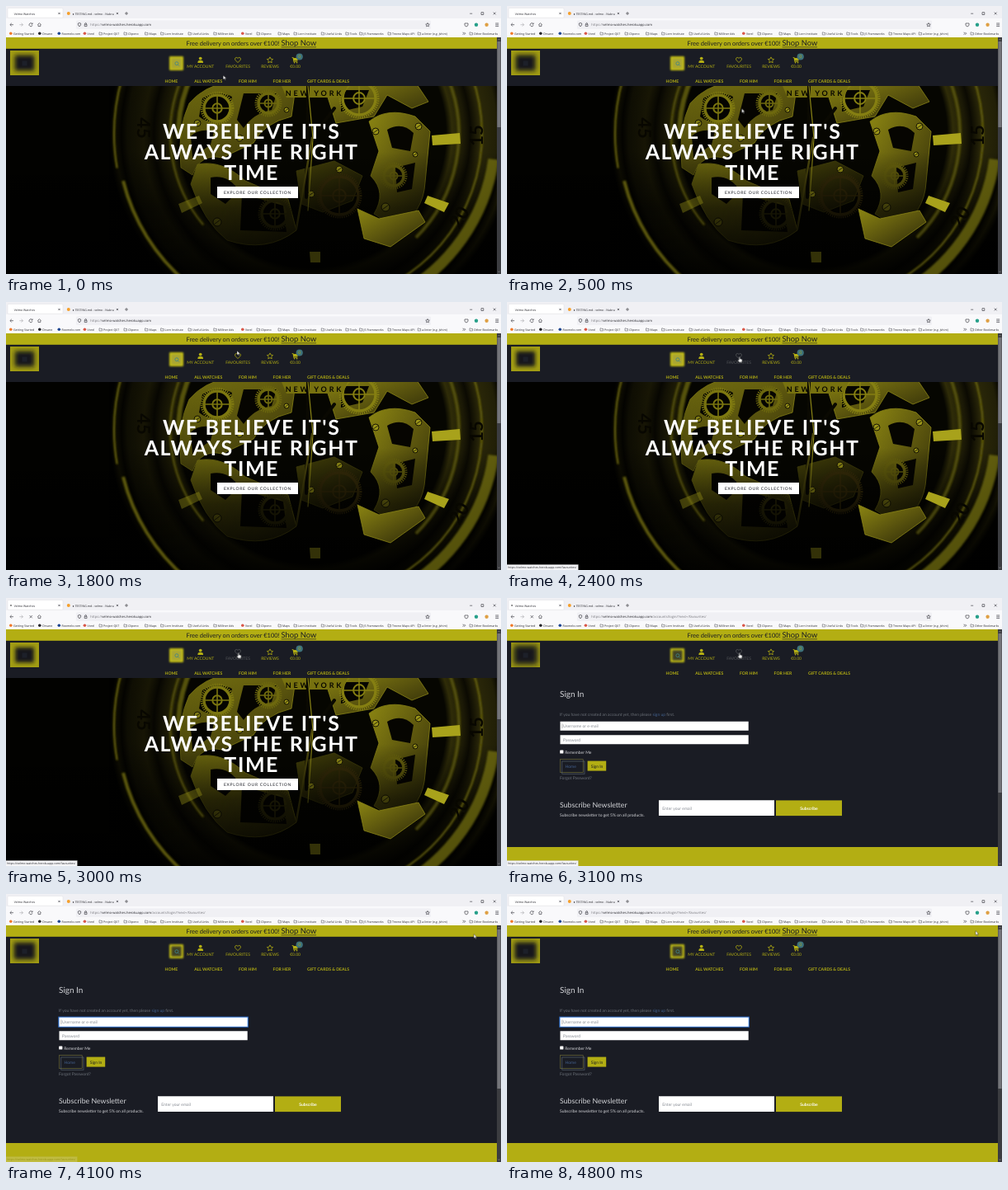
These frames come from a looping animation (600x325 px, 4900 ms). An HTML page:

```html
<!DOCTYPE html>
<html lang="en">
<head>
<meta charset="utf-8">
<title>Velmo Watches</title>
<style>
html, body { margin: 0; width: 100%; height: 100%; overflow: hidden; background: #000; }
svg { display: block; width: 100vw; height: 100vh; text-rendering: geometricPrecision; }
text { font-family: Lato, "Open Sans", sans-serif; font-size: 5px; white-space: pre; }
.ui text { font-family: "Open Sans", "Noto Sans", sans-serif; font-size: 3.55px; fill: #25252b; }
.ui .url { font-size: 4.1px; }
.ui .dim { fill: #77777d; }
.line { fill: none; stroke: #45454c; stroke-width: .7; }
.mid { text-anchor: middle; }
.gold { fill: #b3ae13; }
.goldline { fill: none; stroke: #b3ae13; stroke-width: .8; }
.nav { font-size: 5.1px; font-weight: 700; fill: #b3ae13; }
.title { font-size: 25px; font-weight: 700; letter-spacing: 1.6px; fill: #fff; text-anchor: middle; }
.pale { fill: #d3d4d8; }
.faint { fill: #6b7078; }
.blue { fill: #43618f; }
.hint { fill: #868b93; }
.engrave text { font-size: 22px; font-weight: 700; fill: #080701; text-anchor: middle; }

/* every part shares one 4.9 s clock */
.hero, .login, .load, .idle, .focus, .hand, .arrow, .search { animation: 4.9s step-end infinite; }
.hero { animation-name: hero; }
.login { animation-name: login; }
.load { animation-name: load; }
.idle { animation-name: idle; }
.focus { animation-name: focus; }
.hand { animation-name: hand; }
.arrow { animation-name: arrow; }
.search { animation-name: search; }
.cursor { animation: move 4.9s linear infinite; }
.status { animation: status 4.9s linear infinite; }
.fav { color: #b3ae13; animation: fav 4.9s linear infinite; }
.pulse { transform-box: fill-box; transform-origin: center; animation: pulse 4.9s linear infinite; }

@keyframes hero { 0% { visibility: visible } 63.2%, 100% { visibility: hidden } }
@keyframes login { 0% { visibility: hidden } 63.2%, 100% { visibility: visible } }
@keyframes load { 0% { visibility: hidden } 56.1% { visibility: visible } 66.3%, 100% { visibility: hidden } }
@keyframes idle { 0% { visibility: visible } 56.1% { visibility: hidden } 66.3%, 100% { visibility: visible } }
@keyframes focus { 0% { visibility: hidden } 65.3%, 100% { visibility: visible } }
@keyframes hand { 0% { visibility: hidden } 39.8% { visibility: visible } 77.1%, 100% { visibility: hidden } }
@keyframes arrow { 0% { visibility: visible } 39.8% { visibility: hidden } 77.1%, 100% { visibility: visible } }
@keyframes search { 0% { fill: #a9a530 } 63.2%, 100% { fill: #3f4228 } }
@keyframes move {
  0%, 6.1% { transform: translate(263.3px, 84px); animation-timing-function: ease-in-out }
  20.4%, 25.5% { transform: translate(386.2px, 317.5px); animation-timing-function: ease-in-out }
  36.7% { transform: translate(280px, 59px) }
  42.9%, 76.5% { transform: translate(281.7px, 66.3px); animation-timing-function: ease-in-out }
  82.7% { transform: translate(567px, 48.8px) }
  98%, 100% { transform: translate(568px, 44.6px) }
}
@keyframes status {
  0%, 43.8% { opacity: 0 }
  43.9%, 81.6% { opacity: 1 }
  83.7% { opacity: .2 }
  84.7%, 100% { opacity: 0 }
}
@keyframes fav { 0%, 41.8% { color: #b3ae13 } 46.9%, 77.5% { color: #55575a } 81.6%, 100% { color: #b3ae13 } }
@keyframes pulse {
  0% { transform: scale(.94) } 22% { transform: scale(.98) } 42% { transform: scale(.92) }
  63.1% { transform: scale(.9) } 63.2% { transform: scale(1.14) }
  82% { transform: scale(1.02) } 100% { transform: scale(1.06) }
}
</style>
</head>
<body>
<svg viewBox="0 0 600 325" preserveAspectRatio="none">
<defs>
  <radialGradient id="bezel" gradientUnits="userSpaceOnUse" cx="371" cy="155" r="246">
    <stop offset=".66" stop-color="#060601"/>
    <stop offset=".69" stop-color="#2f2c08"/>
    <stop offset=".75" stop-color="#1b1906"/>
    <stop offset=".78" stop-color="#0b0a02"/>
    <stop offset=".83" stop-color="#2b2809"/>
    <stop offset=".91" stop-color="#211f07"/>
    <stop offset=".94" stop-color="#090801"/>
    <stop offset=".97" stop-color="#2b2807"/>
    <stop offset="1" stop-color="#020200"/>
  </radialGradient>
  <linearGradient id="metal" x1="0" y1="0" x2="1" y2="1">
    <stop offset="0" stop-color="#8b8512"/>
    <stop offset=".5" stop-color="#5c560e"/>
    <stop offset="1" stop-color="#2a2708"/>
  </linearGradient>
  <linearGradient id="shadeX">
    <stop offset="0" stop-color="#000" stop-opacity=".7"/>
    <stop offset=".2" stop-color="#000" stop-opacity=".2"/>
    <stop offset=".4" stop-color="#000" stop-opacity="0"/>
  </linearGradient>
  <linearGradient id="shadeY" x2="0" y2="1">
    <stop offset=".35" stop-color="#000" stop-opacity="0"/>
    <stop offset=".65" stop-color="#000" stop-opacity=".6"/>
    <stop offset="1" stop-color="#000" stop-opacity=".9"/>
  </linearGradient>
  <filter id="soft" x="-50%" y="-50%" width="200%" height="200%"><feGaussianBlur stdDeviation="2.6"/></filter>
  <filter id="halo" x="-50%" y="-50%" width="200%" height="200%"><feGaussianBlur stdDeviation=".9"/></filter>
  <clipPath id="photo"><path d="M0 97H595V325H0Z"/></clipPath>
  <clipPath id="box"><path d="M5 54H40V84H5Z"/></clipPath>
</defs>

<rect y="38" width="595" height="287" fill="#1a1c24"/>

<g class="hero">
  <g clip-path="url(#photo)">
    <path d="M0 97H595V325H0Z" fill="#020200"/>
    <circle cx="371" cy="155" r="246" fill="url(#bezel)"/>
    <g fill="url(#metal)" stroke="#8b8516" stroke-width=".8">
      <path d="M222 118Q240 97 270 92H352L346 134Q312 142 300 166L262 184Q236 178 226 205L212 196Q207 150 222 118Z"/>
      <path d="M232 192Q262 186 290 212L342 234 352 272Q316 300 268 284 240 262 224 216Z"/>
      <path d="M440 140Q462 122 496 134L514 152 508 214Q506 250 474 270L446 252Q462 226 442 206L452 176Z"/>
      <path d="M384 92H496L512 116 492 124 462 108 446 134 400 142Z"/>
      <path d="M352 200L398 188 432 206 420 236 384 250 358 240Z" opacity=".5"/>
    </g>
    <g fill="#060501">
      <path d="M238 112Q256 101 274 110L268 136Q248 146 234 134Z"/>
      <path d="M288 106H328L322 126Q300 130 288 148L280 138Z"/>
      <path d="M224 158Q234 148 252 152L248 168 226 184Z"/>
      <path d="M248 208Q270 204 282 224L266 240 248 228Z"/>
      <path d="M286 228L336 242 340 274 284 272Z"/>
      <path d="M462 150Q480 140 494 154L490 176 468 172Z"/>
      <path d="M472 196L496 190 492 222 474 226Z"/>
      <path d="M406 102H440L432 122 406 128Z"/>
    </g>
    <g id="gears"></g>
    <g id="screws"></g>
    <path d="M334 97H414L408 111H340Z" fill="#77710f"/>
    <g fill="none" stroke-linecap="round">
      <path d="M366 97L364 232M371 160L398 124" stroke="#0a0902" stroke-width="4"/>
      <path d="M366 97L372 160 366 248" stroke="#8c8617" stroke-width="1.2"/>
      <path d="M371 160L352 270" stroke="#4e490d" stroke-width="2.4"/>
    </g>
    <path d="M0 97H595V325H0Z" fill="url(#shadeY)"/>
    <g fill="url(#metal)" stroke="#8b8516" stroke-width=".8">
      <path d="M426 246L452 258 500 248 508 262 466 292 434 282Z"/>
    </g>
    <path d="M125 97H595V325H125Z" fill="url(#shadeX)"/>
    <g id="rims" fill="none" stroke="#8b8511" filter="url(#halo)"></g>
    <g fill="#a8a21b">
      <path d="M516 157L550 154 551 167 517 169Z"/>
      <path d="M511 230L537 239 531 250 507 239Z"/>
      <path d="M368 298H381V311H369Z" opacity=".3"/>
      <path d="M209 240L234 230 238 239 213 251Z" opacity=".35"/>
    </g>
    <g class="engrave">
      <text x="374" y="109" style="font-size:9px;letter-spacing:2.8px">NEW YORK</text>
      <text transform="translate(167 148) rotate(90)" y="8">45</text>
      <text transform="translate(570 157) rotate(-90)" y="8">15</text>
      <text transform="translate(549 256) rotate(-60)" y="8">20</text>
    </g>
  </g>
  <text class="title" x="297.7" y="161">WE BELIEVE IT'S</text>
  <text class="title" x="297.7" y="185.9">ALWAYS THE RIGHT</text>
  <text class="title" x="297.7" y="210.8">TIME</text>
  <rect x="256" y="219" width="98" height="14" fill="#fff"/>
  <text class="mid" x="305" y="228.1" fill="#1a1c24" style="letter-spacing:.75px">EXPLORE OUR COLLECTION</text>
</g>

<g class="login">
  <text class="pale" x="64" y="119.5" style="font-size:10px">Sign In</text>
  <text class="faint" x="64" y="142.6">If you have not created an account yet, then please <tspan class="blue">sign up</tspan> first.</text>
  <rect class="focus" x="63.7" y="149" width="229.8" height="12.4" fill="#3f82dc" stroke="#2b62b4" stroke-width=".8"/>
  <path d="M64.5 149.8H292.7V160.7H64.5ZM64.5 166.3H292.7V177.2H64.5ZM184 245.2H324V264H184Z" fill="#fff"/>
  <path d="M66.9 152.5V158" stroke="#333" stroke-width=".35"/>
  <text class="hint" x="68" y="157">Username or e-mail</text>
  <text class="hint" x="68" y="173.5">Password</text>
  <rect x="64.2" y="184.4" width="4.2" height="4.2" rx=".6" fill="#fff"/>
  <text class="pale" x="70.3" y="188.8">Remember Me</text>
  <rect x="64.4" y="195.7" width="27.8" height="15.6" fill="none" stroke="#77753a" stroke-width=".6"/>
  <rect x="66.8" y="198" width="27.2" height="15.2" fill="none" stroke="#5c6a78" stroke-width=".6"/>
  <text class="blue" x="70.5" y="205.6">Home</text>
  <rect class="gold" x="97.6" y="197.6" width="22.6" height="12"/>
  <text x="101.7" y="205.6" fill="#1a1c24">Sign In</text>
  <text class="faint" x="64" y="219.8">Forgot Password?</text>
  <text class="pale" x="64" y="254" style="font-size:8.75px">Subscribe Newsletter</text>
  <text class="pale" x="64" y="264.6">Subscribe newsletter to get 5% on all products.</text>
  <text class="hint" x="188.3" y="256.6">Enter your email</text>
  <rect class="gold" x="326" y="245.4" width="80" height="18.7"/>
  <text class="mid" x="366" y="256.6" fill="#fff" style="font-weight:700">Subscribe</text>
  <rect class="gold" y="302" width="595" height="23"/>
</g>

<g>
  <rect class="gold" y="38" width="595" height="13.8"/>
  <text x="218.5" y="48.4" fill="#1a1c24" style="font-size:7.5px">Free delivery on orders over €100!</text>
  <text x="333.5" y="48.4" fill="#1a1c24" style="font-size:9.375px">Shop Now</text>
  <path d="M333.6 49.8H376" stroke="#1a1c24" stroke-width=".6"/>
  <g clip-path="url(#box)">
    <path d="M5 54H40V84H5Z" fill="#a19c14"/>
    <rect class="pulse" x="10" y="59" width="25" height="20" fill="#14151c" filter="url(#soft)"/>
    <rect x="19.5" y="66.5" width="6" height="6" fill="#1d2029"/>
  </g>
  <rect x="198" y="61" width="17" height="17" rx="1" fill="#c2bd18" filter="url(#halo)"/>
  <rect class="search" x="200.4" y="63.4" width="12.2" height="12.2" fill="#a9a530" filter="url(#halo)"/>
  <path d="M208.6 71.4L209.9 72.7M208.9 69.7a2 2 0 1 1-4 0a2 2 0 1 1 4 0" fill="none" stroke="#3f858c" stroke-width=".8"/>

  <circle class="gold" cx="235.7" cy="63.6" r="1.9"/>
  <path class="gold" d="M232.4 69V68Q232.4 65.9 234.5 65.9H236.9Q239 65.9 239 68V69Z"/>
  <g class="fav">
    <path d="M281 68.6L278 65.6Q276.9 63.9 278.3 62.7 279.8 61.8 281 63.4 282.2 61.8 283.7 62.7 285.1 63.9 284 65.6Z" fill="none" stroke="currentColor" stroke-width=".8"/>
    <text class="mid" x="281" y="75.1" fill="currentColor">FAVOURITES</text>
  </g>
  <path class="goldline" d="M320 61.9L321.1 64.2 323.6 64.5 321.8 66.3 322.2 68.8 320 67.6 317.8 68.8 318.2 66.3 316.4 64.5 318.9 64.2Z"/>
  <path class="gold" d="M346.6 62H348.2L348.6 63H354.2L353.4 66.4H349L349.2 67.2H353.3V67.9H348.6L347.5 62.8H346.6Z"/>
  <circle class="gold" cx="349.6" cy="68.7" r=".8"/><circle class="gold" cx="352.6" cy="68.7" r=".8"/>
  <circle cx="355.7" cy="61.5" r="4.1" fill="#3e727a"/>
  <text class="mid gold" x="355.7" y="63.3">0</text>
  <text class="mid gold" x="235.7" y="75.1">MY ACCOUNT</text>
  <text class="mid gold" x="320" y="75.1">REVIEWS</text>
  <text class="mid gold" x="350.6" y="75.1">€0.00</text>
  <text class="nav" x="192.5" y="92.6">HOME</text>
  <text class="nav" x="228.2" y="92.6">ALL WATCHES</text>
  <text class="nav" x="282" y="92.6">FOR HIM</text>
  <text class="nav" x="323.6" y="92.6">FOR HER</text>
  <text class="nav" x="365" y="92.6">GIFT CARDS &amp; DEALS</text>
</g>

<g>
  <rect x="595" y="38" width="5" height="287" fill="#3b3c40"/>
  <rect class="hero" x="595.4" y="43" width="4.2" height="104" fill="#74757a"/>
  <rect class="login" x="595.4" y="43" width="4.2" height="193" fill="#74757a"/>
  <path d="M596.4 41.3L597.5 40 598.6 41.3M596.4 321.5L597.5 322.8 598.6 321.5" fill="none" stroke="#aaa" stroke-width=".5"/>
</g>

<g class="ui" id="chrome">
  <rect width="600" height="38" fill="#f9f9fb"/>
  <rect width="600" height="15" fill="#f0f0f4"/>
  <rect x="2" y="2.4" width="67" height="12" rx="1.2" fill="#fff" stroke="#d6d6dc" stroke-width=".4"/>
  <circle class="load" cx="6" cy="9" r=".9" fill="#666"/>
  <text x="9.8" y="10.6">Velmo Watches</text>
  <circle cx="75.8" cy="9" r="2" fill="#f5a02c"/>
  <text x="80.6" y="10.6">● TESTING.md - velmo - Nubra</text>
  <path class="line" d="M63.4 7.9L65.6 10.1M65.6 7.9L63.4 10.1M133.8 7.9L136 10.1M136 7.9L133.8 10.1M144 9H148M146 7V11"/>
  <path class="line" d="M562.2 9.2H565.2M576 7.7H578.8V10.5H576ZM590.8 7.6L593.6 10.4M593.6 7.6L590.8 10.4"/>
  <rect x="85" y="17.6" width="430" height="10.4" rx="1.2" fill="#f0f0f4"/>
  <path class="line" d="M9 22.7H5M6.8 20.8L4.9 22.7 6.8 24.6"/>
  <path class="line" d="M16.4 22.7H20.4M18.6 20.8L20.5 22.7 18.6 24.6" opacity=".4"/>
  <path class="line idle" d="M31.7 21.6A2 2 0 1 0 32 23.2M32.1 20.4V22H30.5"/>
  <path class="line load" d="M28.6 21.1L31.8 24.3M31.8 21.1L28.6 24.3"/>
  <path class="line" d="M38.4 22.6L40.4 20.6 42.4 22.6M39 22.2V24.6H41.8V22.2"/>
  <path class="line" d="M87.4 21L89 20.5 90.6 21V22.8Q90.2 24.2 89 24.8 87.8 24.2 87.4 22.8ZM95.2 22.3H98V24.6H95.2ZM95.7 22.3V21Q96.6 19.9 97.5 21V22.3"/>
  <text class="url dim" x="102.3" y="24.2">https://<tspan fill="#25252b">velmo-watches.herokuapp.com</tspan><tspan class="login">/accounts/login/?next=/favourites/</tspan></text>
  <path class="line" transform="translate(30 0)" d="M481 20.5L481.7 22 483.3 22.2 482.1 23.3 482.4 24.8 481 24 479.6 24.8 479.9 23.3 478.7 22.2 480.3 22Z"/>
  <path class="line" d="M556 21H560V23Q559.6 24.8 558 24.9 556.4 24.8 556 23Z"/>
  <circle cx="570" cy="22.8" r="2.2" fill="#27a08a"/>
  <circle cx="582.6" cy="22.8" r="2.2" fill="#dfa044"/>
  <path class="line" d="M593.2 21H597.2M593.2 22.8H597.2M593.2 24.6H597.2"/>
  <path class="line" d="M553.6 31.8L555 33.3 553.6 34.8M555.4 31.8L556.8 33.3 555.4 34.8"/>
</g>

<g class="ui status">
  <rect x="-.3" y="318.5" width="86.6" height="7" fill="#f4f4f6" stroke="#bbb" stroke-width=".3"/>
  <text x="1.2" y="323.2">https://velmo-watches.herokuapp.com/favourites/</text>
</g>

<g class="cursor" fill="#fff" stroke="#000" stroke-width=".35" stroke-linejoin="round">
  <path class="arrow" d="M0 0V5.2L1.3 4.1 2.2 6 3 5.6 2.1 3.8H3.7Z"/>
  <path class="hand" d="M-.6 .4Q0 -.3 .6 .4V2.6L3 3.2Q3.5 3.5 3.4 4.2L2.9 6.8H-.4L-2 4.4Q-1.8 3.5 -.6 4.2Z"/>
</g>
</svg>

<script>
const add = (id, html) => document.getElementById(id).insertAdjacentHTML('beforeend', html);

// Bookmarks: text start, label, icon colour (folders have none)
const marks = [
  [9, 'Getting Started', '#f07a2a'], [44, 'Orvane', '#26262b'], [67.5, 'Roomelo.com', '#1d4590'],
  [98.6, 'Vorel', '#d9584a'], [118, 'Project QX7'], [148, 'Clipono'], [173.5, 'Maps'],
  [192.6, 'Lorn Institute'], [226, 'Useful Links'], [256.8, 'Milliner Ads'],
  [290, 'Vorel', '#d9584a'], [309, 'Clipono'], [335, 'Maps'], [354, 'Lorn Institute'],
  [387.3, 'Useful Links'], [416.8, 'Tools'], [433.6, 'JS Frameworks'], [468, 'Trevno Maps API'],
  [504.2, 'a-linter (e.g. Jshint)'], [567, 'Other Bookmarks']
];
add('chrome', marks.map(([x, label, color]) => {
  const icon = color
    ? `<circle cx="${x - 3.2}" cy="33.3" r="1.8" fill="${color}"/>`
    : `<path class="line" d="M${x - 5} 31.9h1.4l.5 .6h1.6v2.4h-3.5z" style="stroke-width:.5"/>`;
  return icon + `<text x="${x}" y="34.6">${label}</text>`;
}).join(''));

// Toothed wheels: centre, radius, colour
const gear = (x, y, r, color) =>
  `<g fill="none" stroke="${color}">
    <circle cx="${x}" cy="${y}" r="${r}" stroke-width="3" stroke-dasharray="1.3 1.3"/>
    <circle cx="${x}" cy="${y}" r="${r - 3}" stroke-width="3.4"/>
    <circle cx="${x}" cy="${y}" r="${r * .3}" stroke-width="2"/>
    <path d="M${x - r + 3} ${y}H${x + r - 3}M${x} ${y - r + 3}V${y + r - 3}" stroke-width="1.6"/></g>`;
add('gears', [
  [256, 124, 19, '#8c8612'], [428, 112, 23, '#857f12'], [318, 118, 15, '#6d680e'],
  [404, 230, 26, '#3c310a'], [326, 252, 19, '#39350a'], [470, 206, 15, '#6b650e']
].map(g => gear(...g)).join(''));

const screw = (x, y, r) =>
  `<circle cx="${x}" cy="${y}" r="${r}" fill="#9a9418" stroke="#1a1804"/>
   <path d="M${x - r * .7} ${y + r * .5}L${x + r * .7} ${y - r * .5}" stroke="#2b2806"/>`;
add('screws', [
  [232, 142, 4], [283, 160, 4], [340, 126, 3], [298, 224, 4], [256, 262, 5], [448, 152, 4],
  [500, 146, 4], [496, 180, 3], [460, 244, 5], [404, 198, 4], [370, 228, 4]
].map(s => screw(...s)).join(''));

// Light caught by the case rings: radius, start and end angle, width, opacity
const rim = (r, from, to, width, opacity) => {
  const at = deg => {
    const a = deg * Math.PI / 180;
    return `${371 + r * Math.cos(a)} ${155 + r * Math.sin(a)}`;
  };
  return `<path d="M${at(from)}A${r} ${r} 0 0 1 ${at(to)}" stroke-width="${width}" opacity="${opacity}"/>`;
};
add('rims', [
  [240, 170, 196, 2, .8], [236, 130, 166, 4, .65], [172, 140, 200, 2.5, .5], [162, 178, 222, 6, .6],
  [222, 8, 62, 13, .6], [206, -20, 60, 2, .7], [178, -22, 45, 4, .45], [240, -15, 12, 4, .5]
].map(a => rim(...a)).join(''));
</script>
</body>
</html>
```
